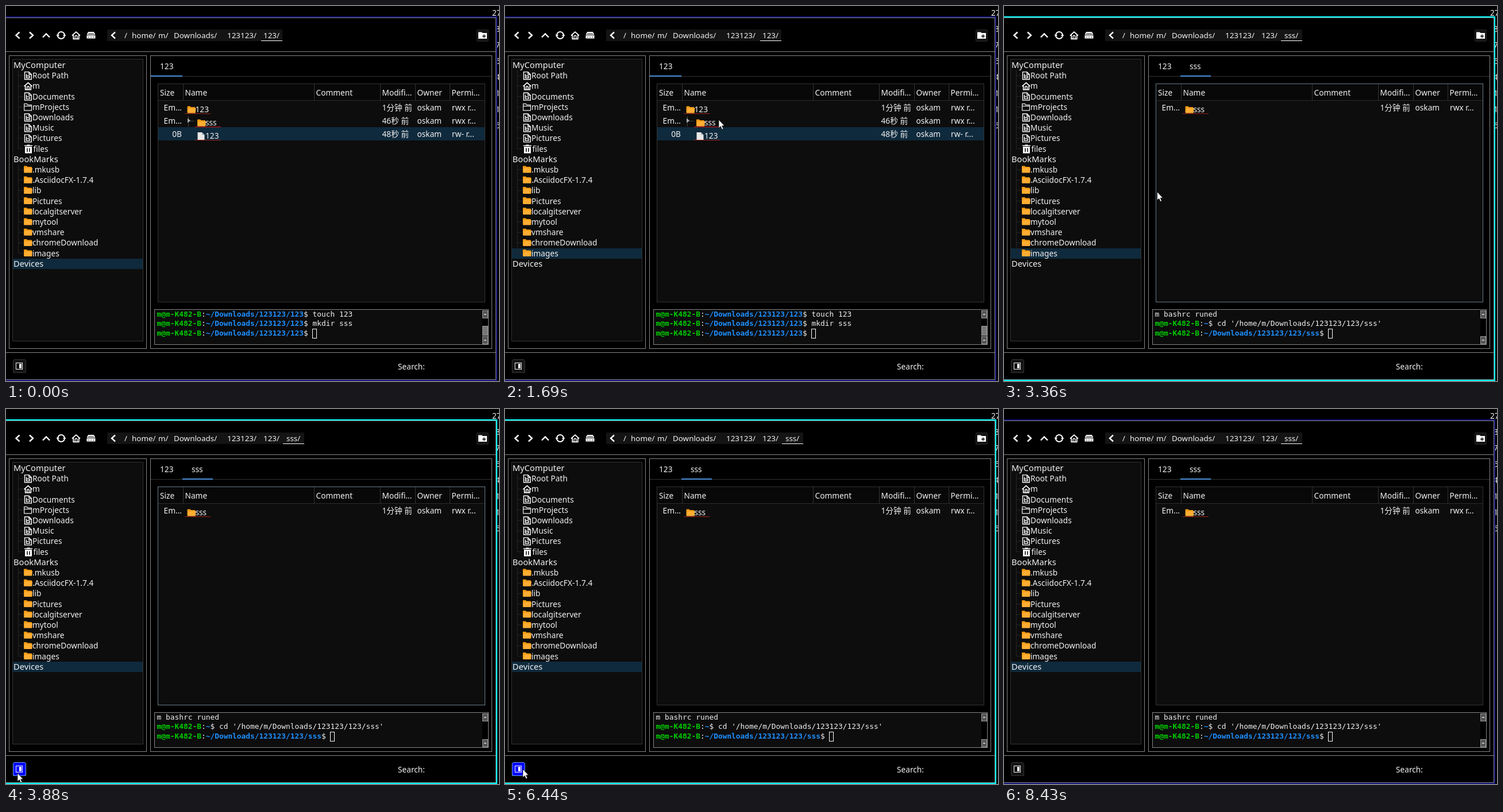
These frames come from a looping animation (858x653 px, 8530 ms). An HTML page:

```html
<!DOCTYPE html>
<html lang="en">
<head>
<meta charset="utf-8">
<title>File manager</title>
<style>
html, body { margin: 0; width: 100%; height: 100%; overflow: hidden; background: #000; }
svg { display: block; }
text { font: 13.7px "Noto Sans", "Noto Sans CJK SC", "Noto Sans CJK", sans-serif; fill: #f2f2f2; white-space: pre; }
text.head { font-size: 14.7px; font-weight: 300; }
text.path { font-size: 13.4px; }
text.mono { font: 12.86px "DejaVu Sans Mono", monospace; }
.user { fill: #00cd00; font-weight: bold; }
.dir { fill: #1e90ff; font-weight: bold; }
rect { shape-rendering: crispEdges; }
</style>
</head>
<body>
<svg width="858" height="653" viewBox="0 0 858 653">
  <g id="view"></g>
  <path id="arrow" d="M0 0V14.6L3.3 11.6L5.6 17L8 16L5.7 10.7H10Z" fill="#fff" stroke="#000" stroke-width=".7"/>
</svg>
<script>
const LOOP = 8530;
const view = document.getElementById("view");
const arrow = document.getElementById("arrow");

// pointer stops: time, x, y
const stops = [
  [270, 60, 577], [560, 170, 440], [640, 215, 432], [960, 343, 385],
  [1110, 343, 385], [1690, 372, 198], [2020, 372, 198], [2100, 379, 203],
  [2400, 420, 235], [2820, 352, 203], [3030, 352, 203], [3360, 267, 323],
  [3880, 20, 634], [3920, 20, 634], [4080, 14, 628], [5880, 14, 628],
  [5920, 13, 626], [6360, 13, 626], [6440, 31, 627], [6770, 31, 627],
  [6850, 38, 630], [7000, 38, 630], [7080, 15, 629], [7600, 15, 629], [7680, 6, 628]
];

const tree = [
  ["MyComputer"], ["Root Path", "doc"], ["m", "home"], ["Documents", "doc"],
  ["mProjects", "open"], ["Downloads", "doc"], ["Music", "doc"], ["Pictures", "doc"],
  ["files", "trash"], ["BookMarks"], [".mkusb", "folder"], [".AsciidocFX-1.7.4", "folder"],
  ["lib", "folder"], ["Pictures", "folder"], ["localgitserver", "folder"], ["mytool", "folder"],
  ["vmshare", "folder"], ["chromeDownload", "folder"], ["images", "folder"], ["Devices"]
];
const ROW = 18.2, TREE_Y = 103;
const OWNER = "oskam", HOST = "m@m-K482-B";
const GREY = "#858585", PANEL = "#0d0d0d";

const between = (t, a, b) => t >= a && t < b;
const box = (x, y, w, h, fill) => `<rect x="${x}" y="${y}" width="${w}" height="${h}" fill="${fill}"/>`;
const frame = (x, y, r, b, line, fill = "none") =>
  `<rect x="${x + .5}" y="${y + .5}" width="${r - x}" height="${b - y}" fill="${fill}" stroke="${line}"/>`;
const text = (x, y, s, attr = "") => `<text x="${x}" y="${y}" ${attr}>${s}</text>`;
const stroke = (d, color = "#fff", w = 1.3) => `<path d="${d}" fill="none" stroke="${color}" stroke-width="${w}"/>`;
const shape = (d, fill) => `<path d="${d}" fill="${fill}"/>`;
const at = (x, y, s) => `<g transform="translate(${x} ${y})">${s}</g>`;

const house = stroke("M.5 7.5L7.5 1.2L14.5 7.5M2.7 6.5V13.3H12.3V6.5", "#fff", 1.7) +
  stroke("M5.7 13V9.5Q5.7 7.3 7.5 7.3Q9.3 7.3 9.3 9.5V13", "#fff", 1.5);
const icons = {
  doc: stroke("M1.5 .7H9L13.3 5V13.5H1.5ZM9 1V5H13M4.5 4V11H10V7.5H4.5", "#fff", 1.4),
  home: house,
  open: stroke("M.7 13V1.5H5.5L7 3.5H13.5V13ZM1 5.5H14", "#eee", 1.2),
  trash: shape("M2 3.5H14V15H2ZM1 1H5.5V0H10.5V1H15V2.5H1Z", "#fff") + stroke("M6 6V12.5M10 6V12.5", "#111", 1.6),
  folder: shape("M0 1.2Q0 .5 1 .5H5L6.5 2H13Q14 2 14 3V11.5H0Z", "#f39a13") + shape("M1.5 4H15L14.2 12.5H.3Z", "#ffad33"),
  file: shape("M.5 0H8L12.5 4.5V14H.5Z", "#e8e8e8") + shape("M8 0V4.5H12.5Z", "#aab4ba")
};

function pointer(t) {
  if (t < 270 || t >= 8430) return null;
  const i = stops.findIndex(s => s[0] > t);
  if (i < 0) return stops[stops.length - 1].slice(1);
  const [t0, x0, y0] = stops[i - 1], [t1, x1, y1] = stops[i];
  const k = (t - t0) / (t1 - t0);
  return [x0 + (x1 - x0) * k, y0 + (y1 - y0) * k];
}

// the row passed last stays lit
function litRow(t) {
  for (let s = Math.min(t, 4000); s >= 270; s -= 10) {
    const [x, y] = pointer(s);
    const row = Math.floor((y - TREE_Y) / ROW + .5);
    if (x >= 12 && x < 239 && row >= 0 && row < tree.length) return row;
  }
  return 19;
}

function backdrop(active) {
  let s = text(846, 17, "27");
  [..."3764116"].forEach((c, i) => s += text(852, 45 + 28 * i, c));
  return s + box(0, 18, 855, 635, active ? "#00ffff" : "#14147c") + box(0, 20, 853, 631, "#000") +
    frame(-2, 20, 852, 650, GREY);
}

function toolbar(deep) {
  const parts = [[206, "/"], [219, "home/"], [265, "m/"], [292, "Downloads/"], [385, "123123/"], [448, "123/"]];
  if (deep) parts.push([488, "sss/"]);
  return box(0, 79, 852, 1, GREY) +
    stroke("M23.5 45.5L17.5 51L23.5 56.5M41 45.5L47 51L41 56.5M64 54.5L70 48.5L76 54.5", "#fff", 2.4) +
    `<circle cx="96" cy="51" r="6" fill="none" stroke="#fff" stroke-width="1.9"/>` +
    shape("M87.5 50H93L90.2 54ZM99 52H104.5L101.7 48Z", "#fff") +
    at(114.5, 44, house) +
    shape("M143 45H153L155.5 50H140.5ZM140.5 51H155.5V56.5H140.5Z", "#fff") +
    stroke("M143 48H153M143 54H145M147 54H149M151 54H153", "#000", 1) +
    box(176, 41, deep ? 343 : 305, 20, "#141414") +
    stroke("M190 45.5L184 51L190 56.5", "#fff", 2.4) +
    parts.map(p => text(p[0], 56, p[1], 'class="path"')).join("") +
    box(deep ? 482 : 444, 60, 37, 1, "#fff") +
    `<rect x="819.5" y="41.5" width="20" height="20" rx="2" fill="#141414" stroke="#242424"/>` +
    shape("M822 45.5H828L829.5 47H837V57H822Z", "#fff") + stroke("M832 49.5V55.5M829 52.5H835", "#000", 1.4);
}

function sidebar(lit) {
  let s = frame(5, 86, 244, 596, GREY) + frame(11, 92, 238, 583, "#333", PANEL) +
    box(12, Math.round(TREE_Y + ROW * lit - 9), 226, 18, "#0f2a3d");
  tree.forEach(([name, icon], i) => {
    const y = TREE_Y + ROW * i;
    if (!icon) { s += text(13, y + 5, name, 'class="head"'); return; }
    s += stroke(`M21.5 ${y - 9}V${y + (tree[i + 1][1] ? 9 : 0)}M21.5 ${y}H30`, "#262626", 1);
    s += at(31, y - 7, icons[icon]) + text(icon === "trash" ? 47.5 : 46, y + 5, name);
  });
  return s;
}

function tabs(stage, off) {
  let s = frame(251 + off, 86, 845, 596, GREY) +
    box(252 + off, 122, 593 - off, 1, "#333") + text(268 + off, 110, "123");
  if (stage) s += text(323 + off, 110, stage === 1 ? "123" : "sss");
  return s + box((stage ? 307 : 252) + off, 121, stage === 2 ? 53 : 55, 2, "#4a90d9");
}

function table(stage, hidden, focus) {
  const left = hidden ? 17 : 264;
  const cols = hidden ? [103, 373, 528, 630, 731] : [308, 536, 651, 712, 772];
  const heads = ["Size", "Name", "Comment", hidden ? "Modified" : "Modifi...", "Owner", hidden ? "Permissions" : "Permi..."];
  let s = frame(left, 135, 833, 515, focus ? "#667a86" : "#333", PANEL) +
    box(left + 1, 136, 832 - left, 28, "#080808") + box(left + 1, 164, 832 - left, 1, "#2c2c2c");
  heads.forEach((h, i) => s += text(i ? cols[i - 1] + 3.5 : left + 4, 156, h));
  cols.forEach(x => s += box(x, 136, 1, 28, "#333"));
  if (stage === 0) s += box(265, 211, 568, 23, "#0f2a3d");

  const minute = "1分钟 前";
  const dir = hidden ? "rwx rwx r-x" : "rwx r...";
  const rows = stage === 2
    ? [[hidden ? "Empty" : "Em...", "sss", minute, dir]]
    : [[stage ? "2 Ite..." : "Em...", "123", minute, dir],
       ["Em...", "sss", stage ? minute : "46秒 前", dir],
       ["0B", "123", stage ? minute : "48秒 前", "rw- r..."]];
  rows.forEach(([size, name, when, perm], i) => {
    const y = 182 + 23 * i, x = cols[0] + 7.5 + (i ? 17.5 : 0);
    s += text(cols[0] - 2, y, size, 'text-anchor="end"') +
      at(x, y - 8, icons[i === 2 ? "file" : "folder"]) +
      text(x + 14, y + 3, name) +
      box(x - 4.5, y + 5, 45, 1, i === 1 ? "#e01010" : "#a0221a") +
      text(cols[2] + 3.5, y, when) + text(cols[3] + 3.5, y, OWNER) + text(cols[4] + 4, y, perm);
  });
  if (stage < 2) {
    s += stroke(stage ? "M317.5 192V223.5H328M318 200.5H328" : "M317.5 192V210M318 200.5H328", "#444", 1) +
      shape("M316 195.5L321 199.5L316 203.5Z", "#aaa");
  }
  return s;
}

function terminal(stage, blank, off) {
  const x = 262.5 + off, base = "/Downloads/123123/123";
  const prompt = dir => `<tspan class="user">${HOST}</tspan>:<tspan class="dir">~${dir}</tspan>$ `;
  let s = frame(258 + off, 528, 839, 589, GREY, blank ? "#000" : PANEL);
  if (blank) return s;
  const dir = base + (stage === 2 ? "/sss" : "");
  const lines = stage
    ? ["m bashrc runed", prompt("") + `cd '/home/m${dir}'`, prompt(dir)]
    : [prompt(dir) + "touch 123", prompt(dir) + "mkdir sss", prompt(dir)];
  lines.forEach((l, i) => s += text(x, 541 + 16.3 * i, l, 'class="mono"'));
  const caret = Math.round(x + 7.742 * (HOST.length + dir.length + 4) - .5);
  s += frame(caret, 562, caret + 7, 578, "#fff") + box(829, 529, 10, 60, "#000");
  for (const y of [530, 575]) s += frame(829, y, 838, y + 13, "#999", "#555") + box(832, y + 6, 4, 2, "#bbb");
  if (!stage) s += frame(829, 557, 838, 573, "#999", "#777");
  return s;
}

function status(hover) {
  const back = hover ? "#0000ff" : "#151515";
  return box(0, 603, 852, 1, GREY) +
    `<rect x="12.5" y="615.5" width="22" height="23" rx="3" fill="${back}" stroke="${hover ? "#6f9fe8" : "#333"}"/>` +
    frame(17, 621, 28, 632, "#fff", hover ? back : "#000") + box(23, 623, 4, 8, "#fff") +
    text(682, 633, "Search:");
}

let last = "";
function draw(t) {
  const tip = pointer(t);
  const stage = t < 2060 ? 0 : t < 3070 ? 1 : 2;
  const active = between(t, 1730, 8430);
  const hidden = between(t, 4000, 4720) || between(t, 6810, 7400);
  const focus = between(t, 3070, 3960);
  const blank = between(t, 2060, 2420);
  const hover = !!tip && tip[0] >= 12 && tip[0] < 36 && tip[1] >= 615 && tip[1] < 640;
  const lit = litRow(t);
  const key = [stage, active, hidden, focus, blank, hover, lit].join();
  if (key !== last) {
    last = key;
    const off = hidden ? -246 : 0;
    view.innerHTML = backdrop(active) + toolbar(stage === 2) + (hidden ? "" : sidebar(lit)) +
      tabs(stage, off) + table(stage, hidden, focus) + terminal(stage, blank, off) + status(hover);
  }
  arrow.style.display = tip ? "" : "none";
  if (tip) arrow.setAttribute("transform", `translate(${tip[0].toFixed(1)} ${tip[1].toFixed(1)})`);
}

const start = performance.now();
function tick() {
  draw((performance.now() - start) % LOOP);
  requestAnimationFrame(tick);
}
tick();
</script>
</body>
</html>
```
